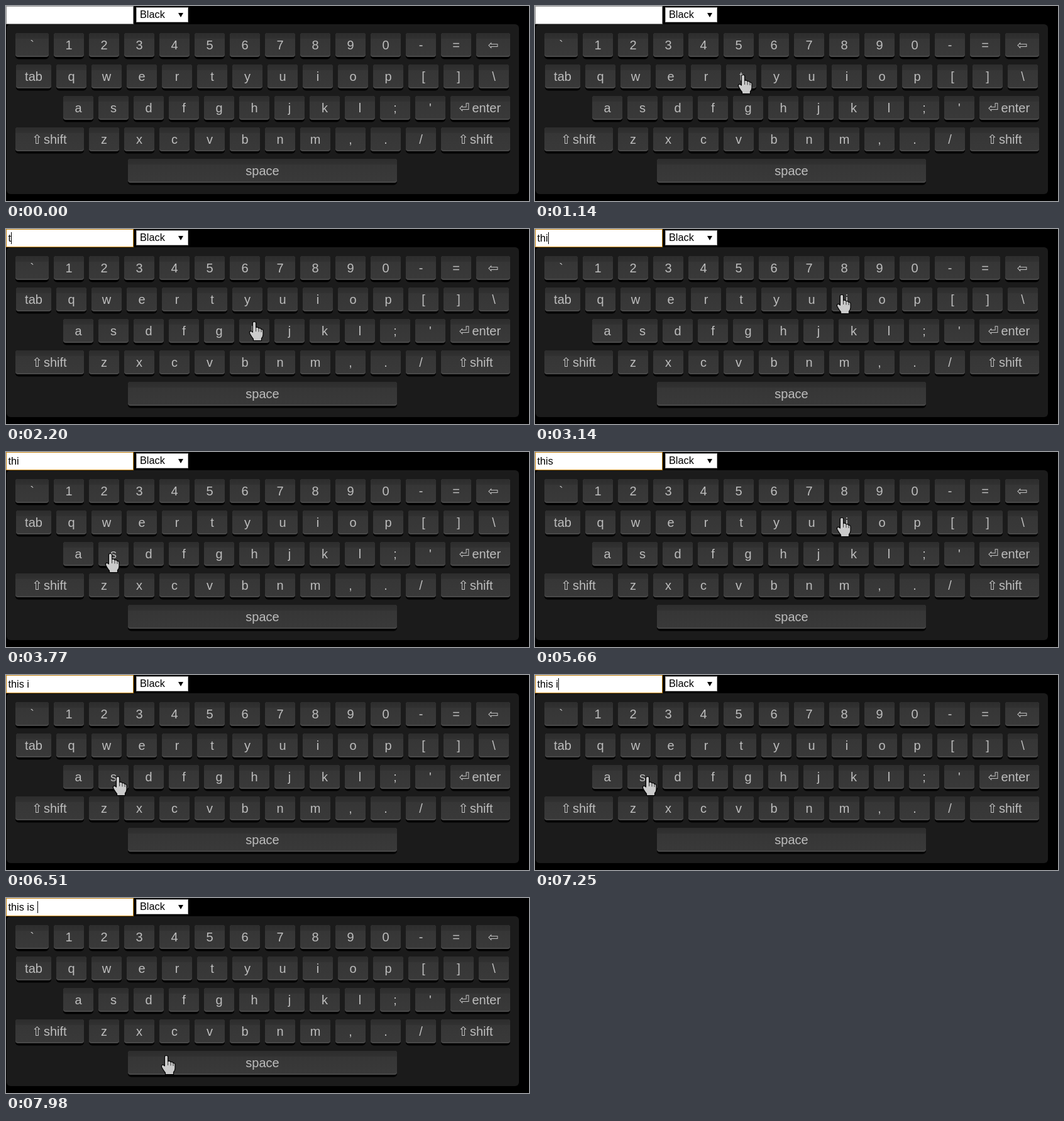
An HTML page for the animation above (8000 ms loop, 832 by 310 pixels).

```html
<!DOCTYPE html>
<html lang="en">
<head>
<meta charset="utf-8">
<title>On-screen keyboard</title>
<style>
  html, body { margin: 0; width: 100%; height: 100%; overflow: hidden; background: #000; }
  svg { display: block; width: 832px; height: 310px; }
  text { font-family: "Liberation Sans", Arial, sans-serif; white-space: pre; }
  .label { font-size: 20px; fill: #bdbdbd; }
  .icon { font-family: "DejaVu Sans", sans-serif; font-size: 20px; fill: #c6c6c6; }
  .field { font-size: 16.3px; fill: #000; }
</style>
</head>
<body>
<svg viewBox="0 0 832 310" xmlns="http://www.w3.org/2000/svg">
  <defs>
    <linearGradient id="face" x1="0" y1="0" x2="0" y2="1">
      <stop offset="0" stop-color="#2d2d2d"/>
      <stop offset=".24" stop-color="#313131"/>
      <stop offset=".26" stop-color="#363636"/>
      <stop offset="1" stop-color="#393939"/>
    </linearGradient>
  </defs>
  <rect width="832" height="310"/>
  <rect x="1" y="29" width="815" height="270" rx="6" fill="#1b1b1b"/>
  <g id="keys"></g>
  <rect id="box" x=".5" y=".5" width="202" height="28" fill="#fff"/>
  <text id="typed" class="field" x="3.5" y="20"></text>
  <rect id="caret" y="5" width="1" height="19"/>
  <rect x="207.5" y="2.5" width="82" height="23" fill="#fff" stroke="#a9a9a9"/>
  <text class="field" x="213" y="19.3">Black</text>
  <path d="M274 11h8l-4 7z"/>
  <g id="hand">
    <path d="M-2.6 17V2.5Q-2.6 .5 0 .5T2.6 2.5V9.5Q6 8.3 7 11Q10 10 11 12.5Q14 12 14 15V21Q14 24 11.5 27V30.5H-1.5V28Q-4 25 -7 19.5Q-8.5 16.5 -6.5 15.5Q-4.5 15 -2.6 17Z"
      fill="#cbcbcb" stroke="#000" stroke-width="1.2" stroke-linejoin="round"/>
    <path d="M2.6 10V16M7 11.5V16.5M11 13V17" fill="none" stroke="#333"/>
  </g>
</svg>
<script>
const LOOP = 8000;
const BEGIN = 290;      // the hand enters
const TICK = 105.3;     // time between screen updates
const FOCUS = 12;       // tick at which the field gains focus
const BLINK = 530;
const ENTRY = [347, 258];

// Typed character, fingertip x and y, arrival tick, press tick
const stops = [
  ["t", 331, 109, 5, 14],
  ["h", 395, 147, 18, 19],
  ["i", 488, 104, 27, 27],
  ["s", 172, 160, 34, 36],
  [" ", 281, 254, 40, 44],
  ["i", 488, 104, 51, 53],
  ["s", 179, 161, 66, 67],
  [" ", 255, 250, 73, 72]
];

const $ = id => document.getElementById(id);

function add(tag, attrs, text = "") {
  const el = document.createElementNS("http://www.w3.org/2000/svg", tag);
  for (const name in attrs) el.setAttribute(name, attrs[name]);
  el.textContent = text;
  $("keys").append(el);
}

function write(x, row, text, type = "label", anchor = "middle") {
  add("text", { x, y: 68.5 + row * 50, class: type, "text-anchor": anchor }, text);
}

function key(x, row, width, label = "") {
  const y = 43 + row * 50;
  add("rect", { x, y: y + 2, width, height: 39.5, rx: 5, fill: "#000" });
  add("rect", { x, y, width, height: 38, rx: 4, fill: "#494949" });
  add("rect", { x, y, width, height: 36, rx: 4, fill: "url(#face)" });
  write(x + width / 2, row, label);
}

function run(x, row, chars) {
  [...chars].forEach((c, i) => key(x + 56 * i, row, 48, c));
}

function shift(x, width, left) {
  key(x, 3, width);
  write(left + 6.5, 3, "⇧", "icon");
  write(left + 17, 3, "shift", "label", "start");
}

key(15, 0, 53, "`");
run(76, 0, "1234567890-=");
key(748, 0, 54);
write(775, 0, "⇦", "icon");
key(16, 1, 56, "tab");
run(80, 1, "qwertyuiop[]\\");
run(91, 2, "asdfghjkl;'");
key(707, 2, 95);
write(729, 2, "⏎", "icon");
write(741.5, 2, "enter", "label", "start");
shift(15, 109, 43);
run(132, 3, "zxcvbnm,./");
shift(692, 110, 721);
key(194, 4, 428, "space");

// Ease out, running slightly past the goal and back
function settle(u) {
  const v = u - 1, pull = 1.2;
  return 1 + (pull + 1) * v ** 3 + pull * v ** 2;
}

function fingertip(tick) {
  let from = ENTRY, leave = 0;
  for (const [, x, y, arrive, press] of stops) {
    if (tick < arrive) {
      const e = settle((tick - leave) / (arrive - leave));
      return [from[0] + (x - from[0]) * e, from[1] + (y - from[1]) * e];
    }
    from = [x, y];
    if (tick <= press) break;
    leave = press;
  }
  return from;
}

function show(id, visible) {
  $(id).setAttribute("visibility", visible ? "visible" : "hidden");
}

function draw(time) {
  const tick = Math.floor((time - BEGIN) / TICK + 0.1);
  const done = stops.filter(s => s[4] <= tick);
  const last = done.length ? done[done.length - 1][4] : FOCUS;
  const focus = tick >= FOCUS;
  const typed = $("typed");

  typed.textContent = done.map(s => s[0]).join("");
  $("box").setAttribute("stroke", focus ? "#c78512" : "#8c8c8c");
  $("caret").setAttribute("x", Math.round(3.5 + typed.getComputedTextLength()));
  show("caret", focus && (tick - last) * TICK % (2 * BLINK) < BLINK);

  show("hand", time >= BEGIN);
  $("hand").setAttribute("transform", `translate(${fingertip(tick).map(Math.round)})`);
}

const start = performance.now();
function frame() {
  draw((performance.now() - start) % LOOP);
  requestAnimationFrame(frame);
}
frame();
</script>
</body>
</html>
```
